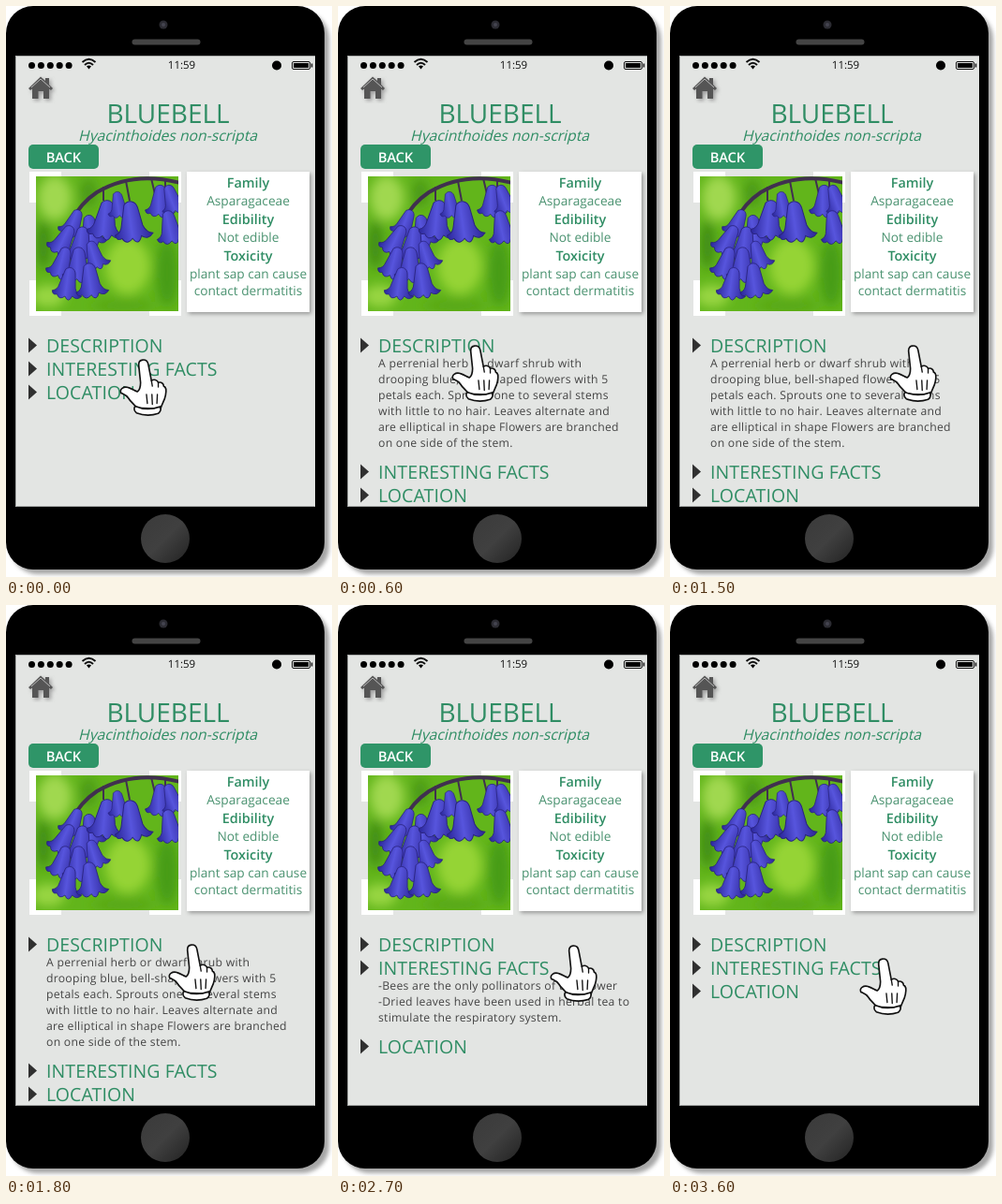
Recreate the animation shown at these times as an HTML page. Size 348 px wide and 610 px high, loop 3900 ms.

```html
<!DOCTYPE html>
<html lang="en">
<head>
<meta charset="utf-8">
<title>Plant guide</title>
<style>
html, body { margin: 0; width: 100%; height: 100%; overflow: hidden; background: #fff; }
svg { display: block; width: 348px; height: 610px; }
text { font-family: "Open Sans", "Noto Sans", sans-serif; fill: #2f8d64; text-rendering: geometricPrecision; }
.mid { text-anchor: middle; }
.head { font-size: 19.5px; letter-spacing: .1px; }
.body { font-size: 12.2px; letter-spacing: .27px; fill: #444; }
.label { font-size: 14.4px; font-weight: 600; }
.value { font-size: 13.7px; fill: #4a9270; }
.clock { font-size: 11.5px; font-weight: 500; fill: #111; }
.back { font-size: 14.7px; font-weight: 600; fill: #fff; }
</style>
</head>
<body>
<svg viewBox="0 0 348 610">
  <defs>
    <filter id="soft" x="-10%" y="-10%" width="120%" height="120%"><feGaussianBlur stdDeviation="2"/></filter>
    <filter id="blur" x="-50%" y="-50%" width="200%" height="200%"><feGaussianBlur stdDeviation="6"/></filter>
    <linearGradient id="button" x2="1" y2="1">
      <stop stop-color="#3a3a3a"/><stop offset=".5" stop-color="#404040"/><stop offset="1" stop-color="#222"/>
    </linearGradient>
    <linearGradient id="petal" x2="1">
      <stop stop-color="#2a2699"/><stop offset=".45" stop-color="#5755dd"/><stop offset="1" stop-color="#2b2494"/>
    </linearGradient>
    <clipPath id="crop"><rect x="32" y="182" width="152" height="144"/></clipPath>
    <path id="bell" d="M-4-13C0-17 5-15 6-10L8 4Q10 10 15 11Q11 16 6 12Q3 20-1 13Q-6 18-9 12Q-13 14-14 9Q-9 8-8 2Z" fill="url(#petal)" stroke="#29237f" stroke-width=".7"/>
    <path id="home" d="M24 88L37 75.500L42 80V77H46V84L50 88L48 90L46 88.500V99H40V91H34.500V99H28V88.500L26 90Z"/>
  </defs>

  <!-- phone -->
  <rect x="5" y="6" width="340" height="601" rx="29" fill="#888" opacity=".75" filter="url(#soft)"/>
  <rect width="340" height="602" rx="29"/>
  <circle cx="168" cy="20" r="4.500" fill="#2c2c33"/>
  <circle cx="168" cy="20" r="2" fill="#444450"/>
  <rect x="134.500" y="35.500" width="73" height="6" rx="3" fill="#444"/>
  <circle cx="170" cy="569" r="26" fill="url(#button)"/>
  <rect x="10" y="53" width="320" height="482" fill="#e3e5e3"/>
  <path d="M329.500 534.500H10.500V53.500H330" fill="none" stroke="#aaacab"/>

  <!-- status bar -->
  <g id="dots"></g>
  <path d="M81.500 60Q88.500 53.500 95.500 60M84 63Q88.500 58.500 93 63" fill="none" stroke="#111" stroke-width="2"/>
  <path d="M86 64.500Q88.500 62.500 91 64.500L88.500 67.500Z"/>
  <text class="mid clock" x="187.500" y="67">11:59</text>
  <circle cx="289" cy="63.500" r="5"/>
  <rect x="305.500" y="59.500" width="19" height="8" rx="1.500" fill="none" stroke="#111"/>
  <rect x="307" y="61" width="16" height="5"/>
  <path d="M326.500 61.500V65.500" stroke="#111" stroke-width="1.500"/>

  <!-- header -->
  <use href="#home" fill="#999" transform="translate(2 2)" filter="url(#soft)"/>
  <use href="#home" fill="#555"/>
  <path d="M27 87L37 78L47 87" fill="none" stroke="#bbb"/>
  <text class="mid" x="173" y="125" font-size="28">BLUEBELL</text>
  <text class="mid" transform="translate(172.500 144) skewX(-14)" font-size="15.700">Hyacinthoides non-scripta</text>
  <rect x="24" y="148" width="75" height="26" rx="5" fill="#2f9568"/>
  <text class="mid back" x="61.500" y="166.500">BACK</text>

  <!-- picture -->
  <path d="M25 177H59V183H32V210H25ZM187 177H153V183H180V210H187ZM25 331H59V325H32V293H25ZM187 331H153V325H180V293H187Z" fill="#fff"/>
  <g clip-path="url(#crop)">
    <rect x="25" y="177" width="161" height="153" fill="#62b51b"/>
    <g filter="url(#blur)">
      <ellipse cx="52" cy="205" rx="18" ry="24" fill="#a0d850"/>
      <ellipse cx="130" cy="278" rx="24" ry="30" fill="#95d435"/>
      <ellipse cx="88" cy="200" rx="9" ry="16" fill="#4b9a18"/>
      <ellipse cx="172" cy="285" rx="12" ry="36" fill="#479c12"/>
      <ellipse cx="40" cy="255" rx="8" ry="26" fill="#3f8c12"/>
      <ellipse cx="45" cy="310" rx="18" ry="12" fill="#98d642"/>
      <ellipse cx="125" cy="320" rx="34" ry="8" fill="#58a818"/>
    </g>
    <path d="M186 189C152 180 122 184 97 199Q79 211 70 230" fill="none" stroke="#40304f" stroke-width="4"/>
    <path d="M104 193V208M128 187L132 208M155 184L164 222M170 185V197" fill="none" stroke="#40304f" stroke-width="2"/>
    <g id="bells"></g>
  </g>

  <!-- facts card -->
  <rect x="195" y="179" width="131" height="150" fill="#777" opacity=".7" filter="url(#soft)"/>
  <rect x="193" y="177" width="131" height="150" fill="#fff"/>
  <g id="card"></g>

  <g id="list"></g>

  <!-- pointer -->
  <g id="hand" fill="#fff" stroke="#111" stroke-width="1.700" stroke-linejoin="round" stroke-linecap="round">
    <path d="M-6.500 6C-7-1.500 2.500-2 4 5L7.500 23C10 21 14 22 15 25C18 24 21 26 21 29C24 30 24 34 23 39C22 45 19 48 17.500 54L-9 53C-11 49-15 47-18 42C-20 39-23 38-26 36.500C-28 32-23 29-18 30.500C-14 31.500-11 34-8 35C-5 33-4.500 30-4.500 25Z"/>
    <path d="M-10.500 51Q3 57 17 51.500Q19 56 15 59Q3 63-9 58.500Q-13 55-10.500 51Z"/>
    <path d="M2 38L3 48M8 38L8.500 49M14 38L13.500 48M7.500 23L8.500 29M15 25V30" fill="none" stroke-width="1.400"/>
  </g>
</svg>
<script>
const $ = id => document.getElementById(id);
const text = (cls, x, y, s) => `<text class="${cls}" x="${x}" y="${y}">${s}</text>`;

$('dots').innerHTML = [0, 1, 2, 3, 4]
  .map(i => `<circle cx="${27.5 + i * 9.9}" cy="63.500" r="3.500"/>`).join('');

// x, y, scale, tilt
$('bells').innerHTML = [
  [72, 232, 1, 20], [90, 240, 1.1, -10], [62, 250, 1.1, 25], [80, 254, 1.2, 5], [94, 266, 1, -18],
  [60, 274, 1.1, 14], [77, 276, 1.2, 0], [66, 296, 1.1, 8], [90, 293, 1.2, -8],
  [106, 228, 1.35, 5], [120, 212, .9, -10], [134, 230, 1.4, -8],
  [164, 208, 1.1, 0], [177, 206, 1, -20], [175, 236, 1.15, -12]
].map(([x, y, s, r]) =>
  `<use href="#bell" transform="translate(${x} ${y}) rotate(${r}) scale(${s})"/>`).join('');

$('card').innerHTML = [
  ['label', 193.5, 'Family'], ['value', 213, 'Asparagaceae'],
  ['label', 233, 'Edibility'], ['value', 252, 'Not edible'],
  ['label', 272, 'Toxicity'], ['value', 291, 'plant sap can cause'], ['value', 309, 'contact dermatitis']
].map(([cls, y, s]) => text(cls + ' mid', 258.5, y, s)).join('');

const sections = [
  ['DESCRIPTION', [
    'A perrenial herb or dwarf shrub with', 'drooping blue, bell-shaped flowers with 5',
    'petals each. Sprouts one to several stems', 'with little to no hair. Leaves alternate and',
    'are elliptical in shape Flowers are branched', 'on one side of the stem.']],
  ['INTERESTING FACTS', [
    '-Bees are the only pollinators of this flower',
    '-Dried leaves have been used in herbal tea to', 'stimulate the respiratory system.']],
  ['LOCATION', []]
];

function listMarkup(open) {
  let y = 362.5, out = '';
  sections.forEach(([title, lines], i) => {
    out += `<path d="M24 ${y - 8}L33 ${y}L24 ${y + 8}Z" fill="#303030"/>` + text('head', 43, y + 7, title);
    y += 25;
    if (i !== open) return;
    lines.forEach((s, n) => out += text('body', 43, y - 1.5 + n * 17, s));
    y += lines.length * 17 + 8;
  });
  return out;
}

// pointer x, pointer y, open section (-1 for none)
const steps = [
  [148, 378, -1], [148, 370, -1], [148, 363, 0], [235, 363, 0], [298, 363, 0], [261, 363, 0], [200, 363, 0],
  [184, 364, -1], [190, 378, 1], [253, 364, 1], [276, 387, 1], [223, 378, 1], [229, 378, -1]
];
const STEP = 300, start = performance.now();
let shown;

function draw(now) {
  const [x, y, open] = steps[Math.floor(Math.max(0, now - start) / STEP) % steps.length];
  if (open !== shown) $('list').innerHTML = listMarkup(shown = open);
  $('hand').setAttribute('transform', `translate(${x} ${y}) scale(.97)`);
  requestAnimationFrame(draw);
}
draw(start);
</script>
</body>
</html>
```
